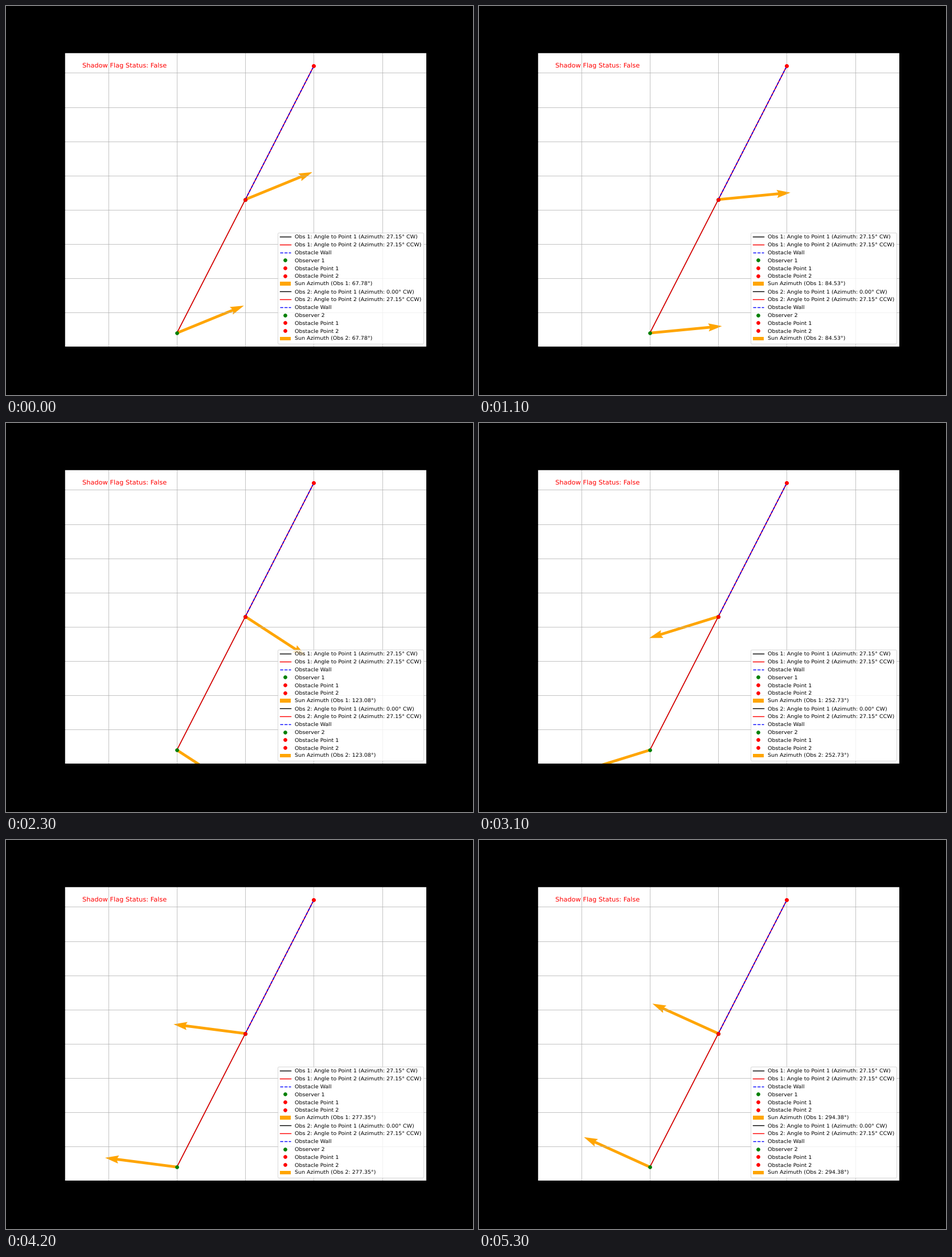
These frames come from a looping animation (820x683 px, 5400 ms). A matplotlib script:

```python
import numpy as np
import matplotlib.pyplot as plt
from matplotlib.animation import FuncAnimation

W, H, DPI = 820, 683, 72
SCALE = W / DPI / 12  # styling is laid out for a figure 12 inches wide
FRAMES, INTERVAL = 54, 100

WALL_START, WALL_END = (2, 4.3), (4, 8.2)
OBSERVERS = [(0, 0.4), WALL_START]

# Sun path over one summer day, one step per quarter hour
START_ANGLE, STEP_ANGLE = -96.9547, 3.75
SIN_LAT = 0.47639
DECLINATION, DECLINATION_DRIFT = 0.34782, -3.05e-5


def sun_azimuth(i):
    """Degrees clockwise from north."""
    hour = np.radians(START_ANGLE + STEP_ANGLE * i)
    south = SIN_LAT * np.cos(hour) - (DECLINATION + DECLINATION_DRIFT * i)
    return 180 + np.degrees(np.arctan2(np.sin(hour), south))


def bearing(a, b):
    return np.degrees(np.arctan2(b[0] - a[0], b[1] - a[1])) % 360


def segment(a, b, style, label):
    ax.plot([a[0], b[0]], [a[1], b[1]], style, label=label)


def draw_observer(n, pos):
    """Draw the sight lines, wall and points; return the sun arrow."""
    to_start, to_end = bearing(pos, WALL_START), bearing(pos, WALL_END)
    segment(pos, WALL_START, "k-",
            f"Obs {n}: Angle to Point 1 (Azimuth: {to_start:.2f}° CW)")
    segment(pos, WALL_END, "r-",
            f"Obs {n}: Angle to Point 2 (Azimuth: {to_end:.2f}° CCW)")
    segment(WALL_START, WALL_END, "b--", "Obstacle Wall")
    ax.plot(*pos, "go", label=f"Observer {n}")
    ax.plot(*WALL_START, "ro", label="Obstacle Point 1")
    ax.plot(*WALL_END, "ro", label="Obstacle Point 2")
    return ax.quiver(*pos, 1, 0, scale=5, color="orange", label=sun_label(n, 0))


def sun_label(n, azimuth):
    return f"Sun Azimuth (Obs {n}: {azimuth:.2f}°)"


plt.rcParams["font.family"] = "DejaVu Sans"
plt.rcParams["text.hinting"] = "none"
for key in ("font.size", "lines.linewidth", "lines.markersize",
            "lines.markeredgewidth", "axes.linewidth", "grid.linewidth",
            "patch.linewidth"):
    plt.rcParams[key] *= SCALE

fig, ax = plt.subplots(figsize=(W / DPI, H / DPI), dpi=DPI, facecolor="black")
fig.subplots_adjust(left=0.125, right=0.9, bottom=0.125, top=0.88)

arrows = [draw_observer(n, pos) for n, pos in enumerate(OBSERVERS, 1)]

# Equal scale on both axes
half_y = 4.29
half_x = half_y * (W * 0.775) / (H * 0.755)
ax.set_xticks(range(-2, 7, 2))
ax.set_yticks(range(1, 9))
ax.set_xlim(2 - half_x, 2 + half_x)
ax.set_ylim(4.3 - half_y, 4.3 + half_y)
ax.tick_params(labelbottom=False, labelleft=False)
ax.grid(True)

ax.text(0.05, 0.95, "Shadow Flag Status: False", color="red",
        fontsize="large", transform=ax.transAxes)
legend = ax.legend(loc="lower right", labelspacing=0.53)
sun_texts = [t for t in legend.get_texts() if t.get_text().startswith("Sun")]


def update(i):
    azimuth = sun_azimuth(i)
    angle = np.radians(azimuth)
    for n, (arrow, text) in enumerate(zip(arrows, sun_texts), 1):
        arrow.set_UVC(np.sin(angle), np.cos(angle))
        text.set_text(sun_label(n, azimuth))
    return arrows + sun_texts


anim = FuncAnimation(fig, update, frames=FRAMES, interval=INTERVAL,
                     init_func=lambda: update(0), repeat=True, blit=False)
plt.show()
```
